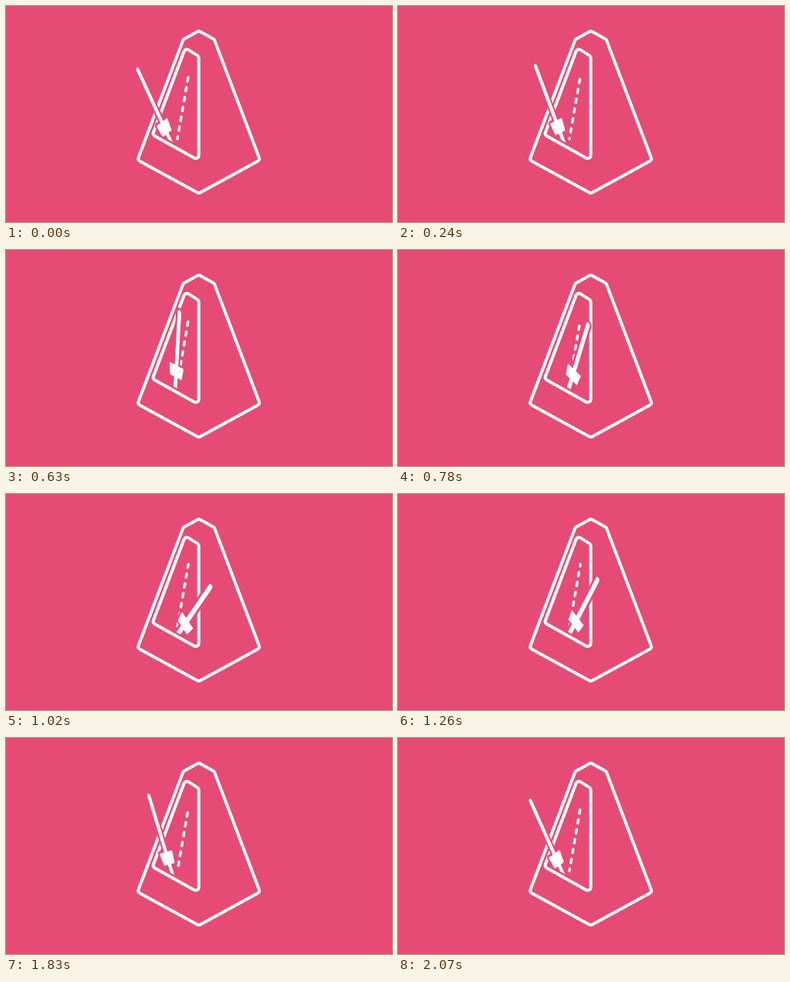
Recreate the animation shown at these times as an HTML page with a canvas. Size 500 px wide and 281 px high, loop 2100 ms.

```html
<!DOCTYPE html>
<html>
<head>
<meta charset="utf-8">
<style>
html, body { margin: 0; width: 100%; height: 100%; overflow: hidden; background: #e64b75; }
canvas { display: block; }
</style>
</head>
<body>
<canvas id="stage" width="500" height="281"></canvas>
<script>
const ctx = document.getElementById('stage').getContext('2d');
const PINK = '#e64b75', WHITE = '#fff';
const LOOP = 2100, STEP = 30, SWING = 1080;
const BODY = [[249.7, 32.3], [269.7, 43.5], [329, 200.3], [249.7, 243.7], [170.4, 200.3], [229.7, 43.5]];
const PANEL = [[232.3, 54.5], [249.7, 65.5], [249.7, 201], [189.8, 167.5]];

function stroke(color, width) {
  ctx.strokeStyle = color;
  ctx.lineWidth = width;
  ctx.stroke();
}

function outline(points, radius) {
  const n = points.length, [a, b] = [points[n - 1], points[0]];
  ctx.beginPath();
  ctx.moveTo((a[0] + b[0]) / 2, (a[1] + b[1]) / 2);
  points.forEach((p, i) => ctx.arcTo(...p, ...points[(i + 1) % n], radius));
  ctx.closePath();
  stroke(WHITE, 4);
}

function rod() {
  ctx.beginPath();
  ctx.moveTo(0, 0);
  ctx.lineTo(0, -110);
}

function weight() {
  ctx.beginPath();
  ctx.moveTo(-12, -38);
  ctx.lineTo(12, -38);
  ctx.lineTo(10, -24);
  ctx.lineTo(-10, -24);
  ctx.closePath();
}

// Share of the swing from left (0) to right (1)
function swing(t) {
  const u = Math.PI * (t < SWING ? t : 2 * SWING - t) / SWING;
  return (1 - Math.cos(u - 0.14 * Math.sin(u))) / 2;
}

function dashes(p) {
  ctx.save();
  ctx.setLineDash([5, 8]);
  ctx.lineDashOffset = -1.6 - 24 * p;
  ctx.beginPath();
  ctx.moveTo(236.2, 91.5);
  ctx.lineTo(222, 173);
  stroke(WHITE, 3.5);
  ctx.restore();
}

function needle(p) {
  ctx.save();
  // Hide everything below the slot's lower edge
  ctx.beginPath();
  ctx.moveTo(0, 0);
  ctx.lineTo(500, 0);
  ctx.lineTo(500, 336);
  ctx.lineTo(0, 56);
  ctx.clip();
  // Tilted plane, then the swing around the pivot
  ctx.transform(0.69, 0.364, -0.055, 0.968, 218.8, 188);
  ctx.rotate((-43.6 + 77.2 * p) * Math.PI / 180);
  rod();
  stroke(PINK, 13);
  weight();
  stroke(PINK, 8);
  rod();
  stroke(WHITE, 6.6);
  weight();
  ctx.fillStyle = WHITE;
  ctx.fill();
  stroke(WHITE, 2);
  ctx.restore();
}

function draw(now) {
  const t = Math.floor(now % LOOP / STEP) * STEP, p = swing(t);
  ctx.fillStyle = PINK;
  ctx.fillRect(0, 0, 500, 281);
  ctx.lineCap = ctx.lineJoin = 'round';
  outline(BODY, 4);
  outline(PANEL, 4);
  dashes(p);
  needle(p);
  requestAnimationFrame(draw);
}

draw(0);
</script>
</body>
</html>
```
